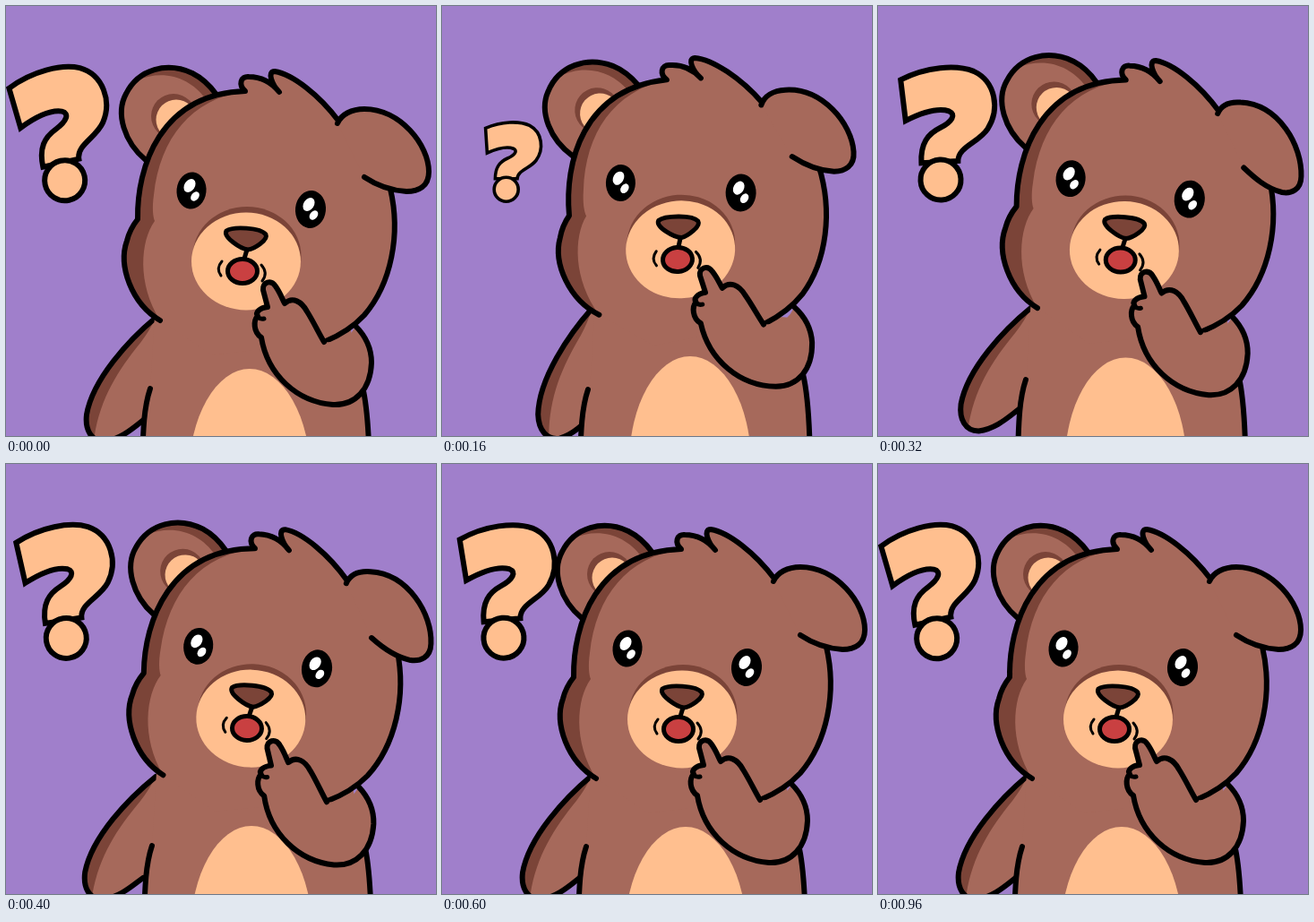
An HTML page that plays this animation: 480x480 px, repeating every 1000 ms.

```html
<!DOCTYPE html>
<html lang="en">
<head>
<meta charset="utf-8">
<title>Puzzled bear</title>
<style>
  html, body { margin: 0; width: 100%; height: 100%; overflow: hidden; background: #a07fcb; }
  svg { display: block; width: 100vw; height: 100vh; }
  .line { fill: none; stroke: #000; stroke-width: 6; stroke-linecap: round; stroke-linejoin: round; }
  .thin { stroke-width: 3; }
  .mid { stroke-width: 5; }
  .fur { fill: #a6695b; }
  .shade { fill: #7b4438; }
  .tan { fill: #ffbf8f; }
  .red { fill: #c94041; }
  .white { fill: #fff; }
</style>
</head>
<body>
<svg viewBox="0 0 480 480">
  <rect width="480" height="480" fill="#a07fcb"/>

  <g id="leftArm">
    <path class="fur" d="M167 348C138 372 97 416 90 456C88 473 95 486 110 486C130 483 143 470 157 459L180 427V345Z"/>
    <path class="shade" d="M167 348C138 372 97 416 90 456C89 470 92 480 98 485C104 440 124 408 150 376Q160 363 167 348Z"/>
    <path class="line" d="M167 348C138 372 97 416 90 456C88 473 95 486 110 486C130 483 143 470 155 461"/>
  </g>

  <g id="body">
    <path class="fur" d="M166 345L161 427C155 445 152 470 152 540H407C408 485 404 450 398 425L385 362Z"/>
    <ellipse class="tan" cx="272" cy="525" rx="68" ry="120"/>
    <path id="pit" class="line" d="M161 427C155 445 152 465 152 540"/>
    <path class="line" d="M398 425C404 450 406 485 406 540"/>
  </g>

  <g id="head">
    <path class="fur" d="M156 172C132 152 122 120 134 98C148 70 180 62 208 75C222 82 230 92 235 99L220 170Z"/>
    <path class="shade" d="M146 83C162 67 190 66 208 75C222 82 230 92 235 99L223 104C206 80 176 70 146 83Z"/>
    <circle class="shade" cx="187" cy="123" r="25"/>
    <circle class="tan" cx="190" cy="127" r="22.5"/>
    <path class="line" d="M156 172C132 152 122 120 134 98C148 70 180 62 208 75C222 82 230 92 235 99"/>

    <path id="headFill" class="fur"/>
    <path id="headShade" class="shade"/>
    <path id="headLine" class="line"/>
    <path class="line" d="M429 204C441 255 430 310 400 345C388 358 372 368 355 375"/>
    <path id="flapFill" class="fur"/>
    <path id="flapLine" class="line"/>

    <g transform="translate(207 206)">
      <ellipse rx="16.5" ry="20.5" transform="rotate(6)"/>
      <ellipse class="white" cx="-2" cy="-5.5" rx="5.8" ry="8" transform="rotate(34 -2 -5.5)"/>
      <ellipse class="white" cx="4" cy="6.5" rx="4.2" ry="5.8" transform="rotate(38 4 6.5)"/>
    </g>
    <g transform="translate(340 227)">
      <ellipse rx="17" ry="21" transform="rotate(6)"/>
      <ellipse class="white" cx="-2" cy="-5.5" rx="5.8" ry="8" transform="rotate(34 -2 -5.5)"/>
      <ellipse class="white" cx="3.5" cy="6.5" rx="4.2" ry="5.8" transform="rotate(38 3.5 6.5)"/>
    </g>

    <ellipse class="shade" cx="269" cy="279" rx="60.5" ry="55"/>
    <ellipse class="tan" cx="268" cy="285" rx="61" ry="54.5"/>
    <path class="line mid" d="M269 272L266 282"/>
    <path class="line mid shade" style="fill:#7b4438" d="M246 251C253 246 284 247 290 255C293 261 277 271 270 272C262 271 242 258 246 251Z"/>
    <ellipse class="line mid" style="fill:#c94041" cx="264" cy="296" rx="16.5" ry="13.5"/>
    <path class="line thin" d="M241 285Q234 293 240 301M285 289Q293 298 286 307"/>
  </g>

  <g id="hand">
    <path id="handFill" class="fur"/>
    <path id="handLine" class="line"/>
    <path class="line mid" d="M281 347Q284 350 288 349"/>
  </g>

  <g id="mark">
    <path class="line" style="fill:#ffbf8f;stroke-linejoin:miter" d="M33 80C62 67 96 66 115 75C139 88 142 119 127 140C116 155 93 158 92 174H51C51 152 60 142 74 136C88 130 93 122 85 118C72 113 52 119 36 126Z"/>
    <circle class="line" style="fill:#ffbf8f" cx="71.5" cy="194" r="22.5"/>
  </g>
</svg>
<script>
const $ = id => document.getElementById(id);
const put = (id, d) => $(id).setAttribute("d", d);
const move = (id, value) => $(id).setAttribute("transform", value);

const LOOP = 1000, STEP = 40;

const side = "M172 351C140 332 125 290 135 262C138 250 143 243 147 238C146 180 172 98 267 95";
const tuft = "C259 88 262 78 271 79C285 79 297 86 305 96C297 88 291 73 300 73C320 76 350 100 371 128";
put("headLine", side + tuft);
put("headFill", side + tuft + "L429 204C441 255 430 310 400 345C388 358 372 368 355 375L230 390Z");
put("headShade", side + "C207 104 172 147 165 211C163 225 164 235 166 240C150 262 146 310 172 351Z");

const arm = "M390 357C401 368 408 382 408 398C407 428 390 446 365 445C325 442 292 412 285 370" +
  "C276 364 276 351 281 346C278 342 283 337 292 336L287 317C286 308 296 305 301 313" +
  "C306 320 308 326 311 332C320 324 330 330 336 341C343 352 349 365 355 375";
put("handLine", arm);
put("handFill", arm + "Q382 377 390 357Z");

// time, head x, y, turn, ear droop, body x, y, hand x, y, turn, left arm x, y, turn, armpit drop
const bearKeys = [
  [0, 0, 0, 0, 0, 0, 0, 0, 0, 0, 0, 0, 0, 0],
  [160, -1, -13, -4.3, 0.3, 5, -14, 4, -19, -3, 1, -10, -8.5, 15],
  [240, 8.5, -24, 0, 1, 7, -24, 7, -24, 0, 7, -23, 0, 5],
  [400, 5, -1, 1.7, 0.55, 2, -1, 3, 2, 1.5, 0, 1, 1, 0],
  [560, 0, 0, 0, 0, 0, 0, 0, 0, 0, 0, 0, 0, 0],
  [LOOP, 0, 0, 0, 0, 0, 0, 0, 0, 0, 0, 0, 0, 0]
];
const scaleKeys = [[0, 1], [80, 0.05], [160, 0.6], [240, 1], [LOOP, 1]];
const swayKeys = [[0, -12.5], [120, 0], [240, 0], [480, -12.2], [680, -1.8], [920, -12.5], [LOOP, -12.5]];

function sample(keys, t) {
  const i = keys.findIndex(k => k[0] > t);
  const a = keys[i - 1], b = keys[i];
  const u = (t - a[0]) / (b[0] - a[0]);
  const s = u * u * (3 - 2 * u);
  return a.slice(1).map((v, n) => v + (b[n + 1] - v) * s);
}

function drawFlap(k) {
  const p = (x, y, dx, dy) => `${x + dx * k} ${y + dy * k} `;
  const d = "M370 131C" + p(374, 121, 0, 0) + p(386, 115, -4, 3) + p(400, 115, -6, 4) +
    "C" + p(440, 115, -2, 6) + p(472, 155, -9, 14) + p(472, 185, -10, 19) +
    "C" + p(472, 202, -10, 17) + p(460, 207, -9, 16) + p(447, 207, -5, 14) +
    "C" + p(428, 206, -3, 10) + p(412, 199, 0, 4) + "400 191";
  put("flapLine", d);
  put("flapFill", d + "Z");
}

function draw(t) {
  const [hx, hy, turn, droop, bx, by, px, py, wrist, ax, ay, swing, pit] = sample(bearKeys, t);
  move("head", `translate(${hx} ${hy}) rotate(${turn} 264 296)`);
  move("body", `translate(${bx} ${by})`);
  move("pit", `translate(${-pit / 5} ${pit})`);
  move("hand", `translate(${px} ${py}) rotate(${wrist} 345 375)`);
  move("leftArm", `translate(${ax} ${ay}) rotate(${swing} 165 352)`);
  drawFlap(droop);
  const [size] = sample(scaleKeys, t), [sway] = sample(swayKeys, t);
  move("mark", `translate(72 221) rotate(${sway}) scale(${size}) translate(-72 -221)`);
}

const start = performance.now();
function tick() {
  const t = (performance.now() - start) % LOOP;
  draw(Math.floor(t / STEP) * STEP);
  requestAnimationFrame(tick);
}
tick();
</script>
</body>
</html>
```
